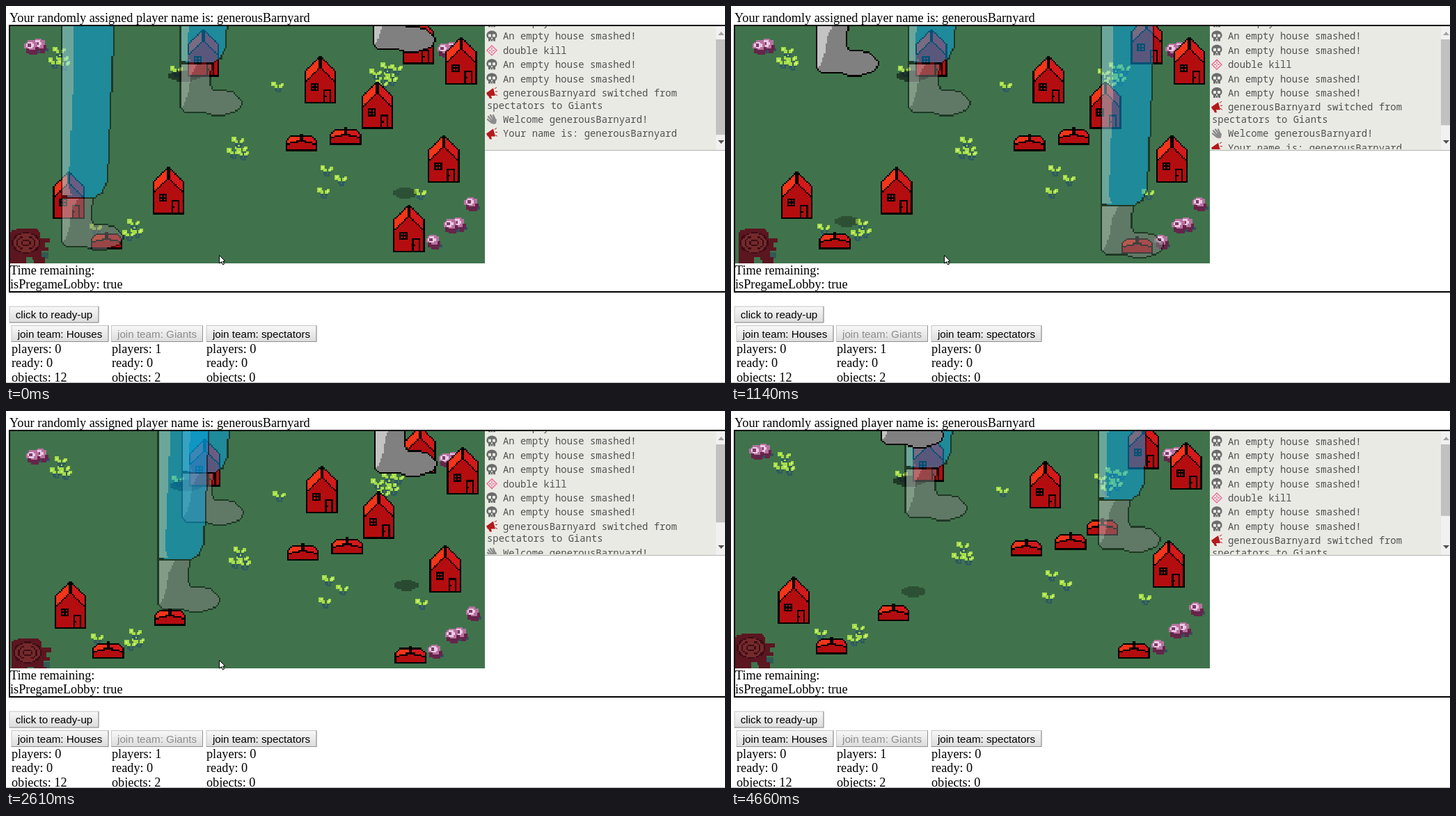
Write an HTML page with a canvas that moves like this. It is 1033x542 px and loops after 4.88 s.

```html
<!DOCTYPE html>
<html lang="en">
<head>
<meta charset="utf-8">
<title>Houses and Giants lobby</title>
<style>
html, body { margin: 0; height: 100%; overflow: hidden; background: #fff; }
canvas { position: absolute; left: 6px; top: 29px; width: 682px; height: 341px; image-rendering: pixelated; }
svg { position: absolute; left: 0; top: 0; }
.serif { font: 18.24px "Liberation Serif", serif; }
.sans { font: 15.2px "Liberation Sans", sans-serif; }
.mono { font: 13.9px "Noto Sans Mono", monospace; fill: #505050; }
</style>
</head>
<body>
<canvas id="field" width="300" height="150"></canvas>
<svg width="1033" height="542" viewBox="0 0 1033 542">
<defs>
  <clipPath id="panel"><path d="M688 29H1020V206H688Z"/></clipPath>
  <linearGradient id="face" x2="0" y2="1"><stop stop-color="#f8f8f8"/><stop offset="1" stop-color="#dcdcdc"/></linearGradient>
  <g id="skull">
    <path fill="#6b6b6b" d="M0-8C9-8 9 2 5 3V7H-5V3C-9 2-9-8 0-8Z"/>
    <path fill="#eaeae4" d="M-5-3h4v4h-4zM1-3h4v4h-4zM-1 2h2v2h-2zM-2 5h1v2h-1zM1 5h1v2h-1z"/>
  </g>
  <path id="target" fill="none" stroke="#f0608e" stroke-width="1.3" d="M0-7L7 0 0 7-7 0ZM0-4V-1M0 1V4M-4 0H-1M1 0H4"/>
  <g id="horn">
    <path fill="#b41a1c" d="M-8 0L2-7 5 4-6 4ZM-5 4h4l1 4h-3Z"/>
    <path fill="none" stroke="#b41a1c" d="M4-6L7-8M5-2H8M5 2L8 4"/>
  </g>
  <g id="wave">
    <path fill="none" stroke="#8b8b8b" stroke-width="2.4" stroke-linecap="round" d="M-5-4L1 3M-2-6L3 1M2-6L5 1M-6 0L0 5"/>
    <path fill="#8b8b8b" d="M-2 2L3-2 7 0 6 6 2 7Z"/>
  </g>
</defs>

<path fill="none" stroke="#000" stroke-width="2" d="M1040 28H5V411H1040"/>
<path fill="#eaeae4" d="M688 29H1020V207H688Z"/>
<path fill="#f1f1f1" d="M1020 29H1033V207H1020Z"/>
<path fill="#a3a3a3" d="M1023 42H1032L1027.500 37Z"/>
<path fill="#505050" d="M1023 193H1032L1027.500 198Z"/>
<rect id="thumb" x="1020" y="48" width="13" fill="#c1c1c1"/>
<path stroke="#b4b4b4" d="M688 207.500H1033"/>
<g clip-path="url(#panel)"><g id="log" class="mono"></g></g>

<g class="serif">
  <text x="5" y="22.500">Your randomly assigned player name is: generousBarnyard</text>
  <text x="6" y="385.500">Time remaining:</text>
  <text x="6" y="406">isPregameLobby: true</text>
  <g id="teams"></g>
</g>
<g id="buttons" class="sans"></g>
<path stroke="#b8b8b8" d="M0 541.500H1033"/>
<path id="cursor" fill="#fff" stroke="#000" d="M.5 .5V12L3.500 9.500 5.500 14 7.500 13 5.500 9H9Z"/>
</svg>

<script>
const LOOP = 4880, ROW = 20.35, TREMOR = 1040;
const $ = id => document.getElementById(id);
const fill = (id, items, draw) => $(id).innerHTML = items.map(draw).join('');
const clamp = v => Math.max(0, Math.min(1, v));
const mix = (a, b, p) => a + (b - a) * p;

// ---- page text ----
const smashed = ['skull', 'An empty house smashed!'];
const log = [...Array(4).fill(smashed), ['target', 'double kill'], smashed, smashed,
  ['horn', 'generousBarnyard switched from', 'spectators to Giants'],
  ['wave', 'Welcome generousBarnyard!'], ['horn', 'Your name is: generousBarnyard']];
let rowY = 43.5;
fill('log', log, ([icon, text, more]) => {
  let row = `<use href="#${icon}" x="698" y="${rowY}"/><text x="714" y="${rowY + 5}">${text}</text>`;
  if (more) row += `<text x="691" y="${(rowY += 17.8) + 5}">${more}</text>`;
  rowY += ROW;
  return row;
});

fill('teams', [[8, 0, 12], [152, 1, 2], [288, 0, 0]], ([x, players, objects]) =>
  [`players: ${players}`, 'ready: 0', `objects: ${objects}`]
    .map((s, i) => `<text x="${x}" y="${499 + i * 20.4}">${s}</text>`).join(''));

fill('buttons', [[5, 432, 128, 'click to ready-up'], [8, 459.5, 139, 'join team: Houses'],
  [151.5, 459.5, 131, 'join team: Giants', '#8c8c8c'], [288, 459.5, 158, 'join team: spectators']],
  ([x, y, w, label, color = '#000']) =>
    `<rect x="${x}" y="${y}" width="${w}" height="23" fill="url(#face)" stroke="#c6c6c6"/>
     <path fill="none" stroke="#8f8f8f" d="M${x} ${y + 23}h${w}v-23"/>
     <text x="${x + w / 2}" y="${y + 17}" text-anchor="middle" fill="${color}">${label}</text>`);

// ---- pixel sprites: each layer is a path, a colour and whether it gets a black rim ----
function sprite(w, h, layers) {
  const c = document.createElement('canvas'), g = c.getContext('2d');
  c.width = w;
  c.height = h;
  for (const [d, color, rim] of layers) {
    const path = new Path2D(d), inside = (x, y) => g.isPointInPath(path, x + .5, y + .5);
    for (let y = 0; y < h; y++) for (let x = 0; x < w; x++) {
      if (!inside(x, y)) continue;
      const core = inside(x - 1, y) && inside(x + 1, y) && inside(x, y - 1) && inside(x, y + 1);
      g.fillStyle = rim && !core ? '#000' : color;
      g.fillRect(x, y, 1, 1);
    }
  }
  return c;
}
const oval = (x, y, rx, ry) => `M${x - rx} ${y}a${rx} ${ry} 0 1 1 ${2 * rx} 0a${rx} ${ry} 0 1 1 ${-2 * rx} 0`;

const house = sprite(20, 30, [
  ['M10-.5L20 9.5V30H0V9.5Z', '#b40d10', true],
  ['M9 1.500L1 9.500V15.500L9 7.500Z', '#f4351a'],
  ['M11 1.500L19 9.500V15.500L11 7.500Z', '#d4191b'],
  ['M0 16.500L10 6.500 20 16.500V17.500L10 7.500 0 17.500ZM9 0h2v8h-2z', '#000'],
  ['M4 17h5v5h-5zM12 29V21h5v8h-1v-7h-3v7zM13 25h1v1h-1z', '#000'],
  ['M5 18h1v1h-1zM7 18h1v1h-1zM5 20h1v1h-1zM7 20h1v1h-1z', '#b40d10']]);
const rubble = sprite(20, 11, [
  ['M10 0H9V1H4L0 4V11H20V4L16 1H11V0Z', '#b40d10', true],
  ['M1 4L4 2H9V4L5 5 1 6Z', '#f4351a'],
  ['M19 4L16 2H11V4L15 5 19 6Z', '#d4191b'],
  ['M0 6.500L5 5 10 4 15 5 20 6.500V7.500L15 6 10 5 5 6 0 7.500ZM9 0h2v5h-2z', '#000']]);
const leg = sprite(40, 200, [
  ['M0 166H21L20 175 19.500 180 22 183.500 27 183 33 184 37 187 40 191 39 195 34 198 27 200H21L16 198H4L0 194Z', '#808080', true],
  ['M1 167H11L7 175 6 183 3 192 1 195Z', '#c3c3c3'],
  ['M0-9H35L34.500 53 32 112 30 156 26.500 163.500 21 167H9L0 166Z', '#00a2e8', true],
  ['M1-9H9L8 90 5 158 6 164 8 165.500 1 165Z', '#99d9ea']]);
const sprout = sprite(9, 7, [
  ['M2 4h2v2h1v-2h2v1h-1v2h-3v-1h-1z', '#2f5a60'],
  ['M0 0h3v2h1v2h-2v-1h-2zM5 2h1v-1h2v2h-1v1h-2z', '#a4dd49'],
  ['M1 1h1v1h-1zM6 2h1v1h-1z', '#dcf27c']]);
const mushroom = sprite(10, 9, [
  ['M5 6h5v2h-2v1h-3z', '#2f5060'],
  ['M1 4h8v3h-1v2h-5v-1h-2z', '#662449'],
  ['M2 0h4v1h2v3h-1v2h-4v-1h-3v-3h1v-1h1z', '#b672a0'],
  ['M2 1h3v1h1v2h-1v1h-3v-1h-1v-2h1z', '#ecc9e2'],
  ['M2 2h2v2h-2z', '#7d3b69']]);
const stump = sprite(27, 22, [
  ['M18 15h6v4h-2v3h-6z', '#2f5a55'],
  ['M0 2L5 0H16L19 3V6H25V9H22V12H24V14H20V18H22V22H15L14 18H10V22H0Z', '#5b1620'],
  ...[9, 8, 6, 5, 3, 2].map((r, i) => [oval(10, 9, r, r * .75), i % 2 ? '#742a2b' : '#3c0c15'])]);
const shadow = sprite(20, 7, [[oval(10, 3.5, 10, 3.5), '#000']]);

// ---- world, in field pixels ----
// Centre and size of each clump
const sprouts = [[31, 21, 4], [169, 38, 1], [238, 31, 7], [144, 78, 4], [200, 91, 1], [209, 97, 1],
  [198, 105, 1], [259, 106, 1], [54, 128, 1], [78, 130, 3], [105, 28, 1]];
const mushrooms = [[17, 12, 2], [292, 112, 1], [282, 125, 2], [268, 136, 1], [278, 14, 2]];
const houses = [[248, -6], [112, 2], [275, 7], [186, 19], [222, 35], [264, 69], [90, 89], [27, 92],
  [242, 113], [174, 48, true], [202, 44, true], [51, 110]];

// Each giant waits for the other one's stomp, then lifts, travels and lands
const steps = [
  { leg: 'A', land: 0, x: 32, y: 142 },
  { leg: 'C', land: 340, x: 229, y: 147 },
  { leg: 'A', land: 1950, x: 92, y: 112, travel: 1150 },
  { leg: 'C', land: 3340, x: 229, y: 77, travel: 300 },
  { leg: 'A', land: Infinity, x: 92, y: 112, travel: 300 }];
const stomps = steps.slice(1, 4);

function pose(name, t) {
  let foot;
  steps.forEach((s, i) => {
    if (s.leg !== name) return;
    const since = i ? t - steps[i - 1].land : 0;
    if (t >= s.land) foot = { x: s.x, y: s.y, h: 0 };
    else if (!foot) foot = { x: s.x, y: t < 50 ? 116 : t < 190 ? 120 : 140, h: t < 50 ? 99 : 1 };
    else if (since > 160) {
      // rests with the tremor, then hovers above the landing spot
      const clock = since < 1360 ? Math.min(since, TREMOR) : since;
      const p = since < 1360 ? clamp((clock - 480) / s.travel) : 1;
      const rise = (clock - 160) * .158;
      foot = { x: mix(foot.x, s.x, p), y: mix(foot.y, s.y, p), h: p < 1 ? rise : Math.min(101, rise) };
    }
  });
  return foot;
}

const covers = (s, [x, y]) => Math.abs(x + 10 - s.x - 20) < 28 && Math.abs(y + 30 - s.y) < 14;

function shake(t) {
  const k = stomps.findIndex(s => t >= s.land && t < s.land + TREMOR);
  if (k < 0) return [0, 0];
  const n = Math.floor((t - stomps[k].land) / 45) + 1;
  return [3 * n % 4, (n * n + 2 * k) % 4];
}

const ctx = $('field').getContext('2d');
ctx.imageSmoothingEnabled = false;

function put(img, x, y, alpha = 1, w = img.width) {
  ctx.globalAlpha = alpha;
  ctx.drawImage(img, Math.round(x), Math.round(y), Math.round(w), img.height);
}
const clump = (img, gap) => ([x, y, n]) => {
  for (let i = 0; i < n; i++) {
    const r = n > 1 ? gap * Math.sqrt(i + .5) : 0;
    put(img, x - img.width / 2 + r * Math.cos(i * 2.4), y - img.height / 2 + r * Math.sin(i * 2.4) * .8);
  }
};
function drawShadow({ x, y, h }) {
  const r = 7.5 + 2.5 * clamp((66 - h) / 17);
  if (h) put(shadow, x + 20 - r, y - 14, .6 - h * .003, 2 * r);
}
const drawLeg = ({ x, y, h }) => put(leg, x, y - h - leg.height, h ? 1 : .5);

function drawField(t) {
  const giants = [pose('A', t), pose('C', t)];
  ctx.setTransform(1, 0, 0, 1, 0, 0);
  ctx.globalAlpha = 1;
  ctx.fillStyle = '#40734c';
  ctx.fillRect(0, 0, 300, 150);
  ctx.translate(...shake(t));
  put(stump, 0, 128);
  sprouts.forEach(clump(sprout, 3.2));
  mushrooms.forEach(clump(mushroom, 3));
  put(shadow, 100, 28, .5);
  giants.forEach(drawShadow);
  for (const h of houses) {
    const flat = h[2] || steps.some(s => t >= s.land && covers(s, h));
    put(flat ? rubble : house, h[0], h[1] + (flat ? 20 : 0));
  }
  drawLeg({ x: 107, y: 57, h: 0 });
  giants.forEach(drawLeg);
}

function cursorAt(t) {
  const p = clamp((t - 3570) / 270), q = clamp((t - 3970) / 90);
  return t > 4100 ? [0, -50] : [mix(306, 545, p) + 182 * q, mix(358, 401, p) - 21 * q];
}

const set = (id, name, value) => $(id).setAttribute(name, value);

function frame() {
  const t = performance.now() % LOOP;
  const added = stomps.filter(s => t >= s.land).length;
  drawField(t);
  set('log', 'transform', `translate(0 ${(added - 3) * ROW})`);
  set('thumb', 'height', 141 * 178 / (183 + added * ROW));
  set('cursor', 'transform', `translate(${cursorAt(t)})`);
  requestAnimationFrame(frame);
}
frame();
</script>
</body>
</html>
```
